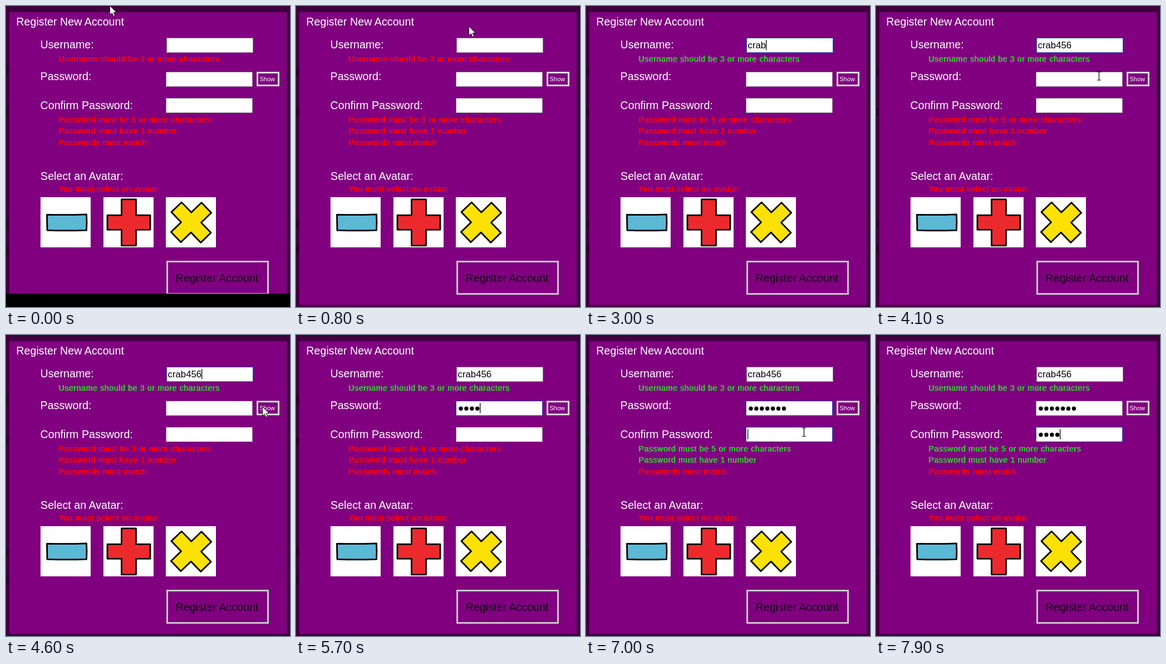
An HTML page that plays this animation: 510 px wide and 540 px high, repeating every 8000 ms.

```html
<!DOCTYPE html>
<html lang="en">
<head>
<meta charset="utf-8">
<title>Register New Account</title>
<style>
  html, body { margin: 0; width: 100%; height: 100%; overflow: hidden; background: #400040; }
  svg { display: block; width: 510px; height: 540px; }
  text { font-family: "Liberation Sans", Arial, sans-serif; white-space: pre; }
  .label { font-size: 19.7px; fill: #fff; }
  .rule { font-size: 14px; letter-spacing: .7px; fill: red; }
  .rule.ok { fill: #32cd32; }
  .entry { font-size: 16.8px; fill: #000; }
  .ink { stroke: #000; stroke-width: 2.8; stroke-linejoin: round; }
</style>
</head>
<body>
<svg viewBox="0 0 510 540">
  <rect width="510" height="540" fill="#400040"/>
  <path d="M0 108h6v17h-6zM0 183h6v15h-6zM0 383h6v16h-6zM0 430h6v15h-6z" fill="#300030"/>
  <rect x="6" y="11" width="498" height="525" fill="#800080"/>

  <g class="label">
    <text x="18.300" y="35">Register New Account</text>
    <text x="61.500" y="76">Username:</text>
    <text x="61.500" y="133">Password:</text>
    <text x="61.500" y="185">Confirm Password:</text>
    <text x="62" y="312">Select an Avatar:</text>
  </g>

  <g id="rules"></g>
  <use href="#rules" x="0.9"/>
  <g id="fields"></g>

  <rect x="451.5" y="119.5" width="38" height="23" fill="none" stroke="#e3dce3" stroke-width="3"/>
  <text x="455.5" y="135" font-size="11" fill="#fff">Show</text>

  <g id="avatars"></g>

  <rect x="289.500" y="458.500" width="181" height="58" fill="none" stroke="#c8c8c8" stroke-width="3"/>
  <text x="304.500" y="495" font-size="19.7" fill="#180018">Register Account</text>

  <rect id="cover" y="516" width="510" height="24" fill="#000"/>
  <rect id="caret" width="1.3" height="18" fill="#000"/>
  <path id="arrow" d="M0 0V16.500L3.900 13L6.500 19L9.200 17.800L6.700 12H11.800Z" fill="#fff" stroke="#1a0a1a"/>
  <path id="beam" d="M-3.500 -7.500H3.500M0 -7.500V7.500M-3.500 7.500H3.500" fill="none" stroke="#000" stroke-width="1.200"/>
</svg>
<script>
const LOOP = 8000, STEP = 100, BLINK = 530, PITCH = 9.9;
const $ = id => document.getElementById(id);

function add(parent, tag, attrs, text = '') {
  const el = document.createElementNS('http://www.w3.org/2000/svg', tag);
  for (const k in attrs) el.setAttribute(k, attrs[k]);
  el.textContent = text;
  return parent.appendChild(el);
}

// Outline of a cross with arms reaching a and b, half as thick as 2h
const cross = (a, b, h) =>
  `M${-h} ${-b}H${h}V${-h}H${a}V${h}H${h}V${b}H${-h}V${h}H${-a}V${-h}H${-h}Z`;

[
  ['#5bb9d6', 62, 'M-34 -14Q2 -13 37 -14.500Q38 0 37 14Q2 15 -33.500 14Z', 0],
  ['#ec2a2e', 175, cross(38.500, 41.500, 13), 0],
  ['#fbe106', 287, cross(38, 38, 12.700), 46]
].forEach(([fill, x, d, turn]) => {
  const g = add($('avatars'), 'g', { transform: `translate(${x} 343)` });
  add(g, 'rect', { width: 90, height: 90, fill: '#fff' });
  add(g, 'path', { d, fill, class: 'ink', transform: `translate(45.500 45.300) rotate(${turn})` });
});

const rules = [
  [100, 'Username should be 3 or more characters', (u, p) => u >= 3],
  [209, 'Password must be 5 or more characters', (u, p) => p >= 5],
  [229, 'Password must have 1 number', (u, p) => p >= 7],
  [250, 'Passwords must match', () => false],
  [333, 'You must select an avatar', () => false]
].map(([y, text, test]) => ({ test, el: add($('rules'), 'text', { x: 94, y, class: 'rule' }, text) }));

// Typing starts at `type`, one character every `gap` ms
const fields = [
  { x: 288, y: 57, value: 'crab456', focus: 1900, blur: 5000, type: 2100, gap: 230 },
  { x: 287, y: 118, focus: 5000, blur: 7400, type: 5250, gap: 150 },
  { x: 287, y: 165, focus: 6800, blur: LOOP, type: 7400, gap: 155 }
];
for (const f of fields) {
  const g = $('fields');
  f.frame = add(g, 'rect', { x: f.x + .5, y: f.y + .5, width: 155, height: 26, fill: '#fff' });
  if (f.value) f.text = add(g, 'text', { x: 290.500, y: f.y + 19, class: 'entry' });
  else f.dots = Array.from({ length: 7 }, (_, i) =>
    add(g, 'circle', { cx: 296 + i * PITCH, cy: f.y + 14, r: 3.7 }));
}

// Pointer legs: an eased line that may bow sideways, then a rest until `end`
const leg = (start, stop, end, from, to, bow = 0) => ({
  start, end,
  at(t) {
    const k = Math.min(1, (t - start) / (stop - start));
    const e = k * k * (3 - 2 * k);
    return [from[0] + (to[0] - from[0]) * e + bow * Math.sin(Math.PI * k), from[1] + (to[1] - from[1]) * e];
  }
});
const sweep = {
  start: 900, end: 1800,
  at(t) {
    const a = 5.53 * (t - 900) / 900;
    return [265 - 200 * Math.sin(a), 206 - 152 * Math.cos(a)];
  }
};
const legs = [
  leg(0, 800, 900, [186, -1], [310, 36]),
  sweep,
  leg(1800, 1900, 2100, [418, 81], [374, 72]),
  leg(3600, 4100, 4100, [374, 72], [400, 125], 45),
  leg(4100, 5000, 5300, [400, 125], [385, 130], 70),
  leg(6500, 6800, 7400, [385, 130], [391, 174])
];

const show = (el, on) => el.setAttribute('visibility', on ? 'visible' : 'hidden');
const move = (el, x, y) => el.setAttribute('transform', `translate(${x} ${y})`);

function draw(t) {
  for (const f of fields) {
    f.count = Math.max(0, Math.min(7, Math.floor((t - f.type) / f.gap) + 1));
    f.frame.setAttribute('stroke', t >= f.focus && t < f.blur ? '#1c58b4' : '#8c7c8c');
    if (f.text) f.text.textContent = f.value.slice(0, f.count);
    else f.dots.forEach((d, i) => show(d, i < f.count));
  }
  for (const r of rules) r.el.classList.toggle('ok', r.test(fields[0].count, fields[1].count));

  const active = fields.filter(f => t > f.focus + STEP).pop();
  show($('caret'), false);
  if (active) {
    const { text, count, type, gap, focus, y } = active;
    const last = count ? type + (count - 1) * gap : focus;
    const width = text ? text.getComputedTextLength() : count * PITCH;
    show($('caret'), (t - last) % (2 * BLINK) < BLINK);
    move($('caret'), Math.floor(290.700 + width), y + 4);
  }

  const now = legs.find(l => t >= l.start && t < l.end);
  const p = now && now.at(t).map(Math.round);
  const inside = p && fields.some(f => p[0] >= f.x && p[0] < f.x + 156 && p[1] >= f.y && p[1] < f.y + 27);
  show($('arrow'), p && !inside);
  show($('beam'), inside);
  if (p) move($(inside ? 'beam' : 'arrow'), p[0] + .5, p[1] + .5);
  show($('cover'), t < STEP);
}

const start = performance.now();
function tick() {
  const t = (performance.now() - start) % LOOP;
  draw(Math.floor(t / STEP) * STEP);
  requestAnimationFrame(tick);
}
tick();
</script>
</body>
</html>
```
